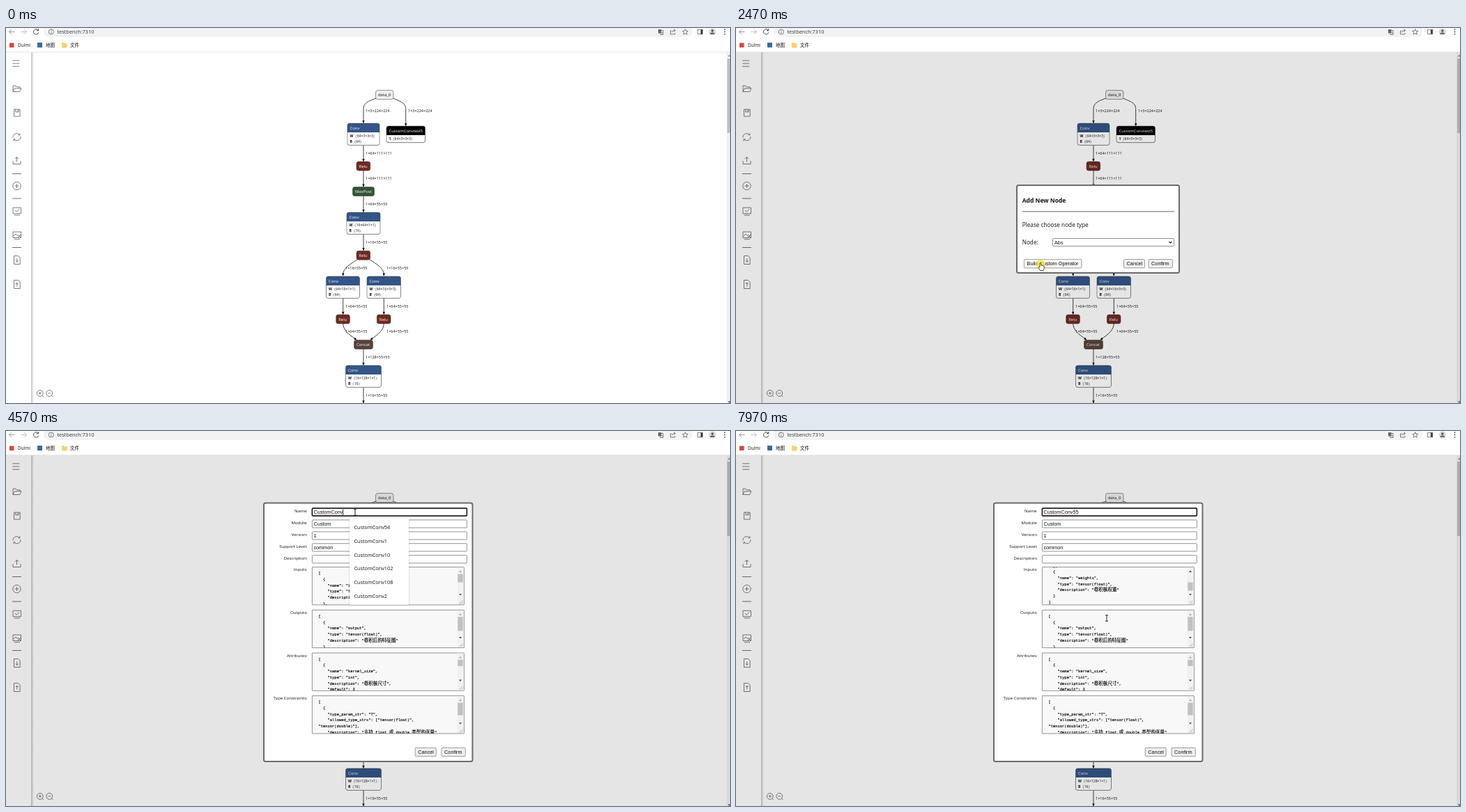
These frames come from a looping animation (1039 by 539 pixels, 8 s). An HTML page:

```html
<!DOCTYPE html>
<html lang="zh-CN">
<head>
<meta charset="utf-8">
<title>Graph editor</title>
<style>
  html, body { margin: 0; height: 100%; overflow: hidden; background: #fff; }
  svg.stage { display: block; width: 100vw; height: 100vh; }
  text { font-family: "Open Sans", "Noto Sans CJK SC", "Noto Sans CJK", sans-serif; fill: #111; }
  .ui { font-family: "Liberation Sans", Arial, sans-serif; font-size: 7.27px; }
  .code { font-family: "Liberation Mono", "Noto Sans CJK SC", "Noto Sans CJK", monospace; font-size: 5.45px; fill: #000; stroke: #000; stroke-width: .14; }
  .end { text-anchor: end; }
  .line { fill: none; stroke: #666; stroke-width: .85; }
  .edge { fill: none; stroke: #111; stroke-width: .8; }
  .field { fill: #fff; stroke: #767676; stroke-width: .8; }
  .focus { fill: none; stroke: #101010; stroke-width: 1.5; }
  .frame { fill: #fff; stroke: #6b6b6b; stroke-width: 2; }
  .wave { stroke: #d33; stroke-width: .7; stroke-dasharray: 1 1; }
  .caretLine { stroke: #000; stroke-width: .8; }
  .glow { fill: #f8ec30; opacity: .75; }
  .move { animation: move 8s ease-in-out infinite; }
  .scroll { animation: scroll 8s infinite; }
  .thumb { animation: thumb 8s infinite; }
  .fade { animation: fade 8s linear infinite; transform-origin: 535.5px 168px; }
  @keyframes scroll {
    0%, 91.75% { transform: none; animation-timing-function: ease-out; }
    96.875%, 100% { transform: translateY(-54.3px); }
  }
  @keyframes thumb {
    0%, 91.75% { transform: none; animation-timing-function: ease-out; }
    96.875%, 100% { transform: translateY(12px); }
  }
  @keyframes fade {
    0%, 65.25% { opacity: 1; transform: none; }
    67.125% { opacity: .1; transform: scale(.955); }
    68.1%, 100% { opacity: 0; transform: scale(.95); }
  }
</style>
</head>
<body>
<script>
const LOOP = 8000;
const pct = ms => ms * 100 / LOOP + '%';

// When each part is visible, in ms.
const visible = {
  tip: [[1180, 1440]],
  dim: [[1440, LOOP]],
  picker: [[1440, 2540]],
  selectFocus: [[1440, 2400]],
  press: [[2400, 2540]],
  form: [[2540, LOOP]],
  nameFocus: [[3030, LOOP]],
  clickAdd: [[1380, 1440]],
  clickBuild: [[2400, 2540]],
  clickName: [[3030, 3100]],
  arrow: [[410, 1180], [1440, 2130], [2540, 2960]],
  hand: [[1180, 1440], [2130, 2540]],
  beam: [[2960, LOOP]],
  listAll: [[3100, 5020]],
  listFive: [[5020, 5580]],
  key1: [[5020, LOOP]],
  key2: [[5220, LOOP]],
  caret0: [[3510, 4040], [4570, 5020]],
  caret1: [[5020, 5220]],
  caret2: [[5220, 5770], [6300, 6830], [7360, 7890]],
  wave0: [[3100, 5020]],
  wave2: [[6520, LOOP]],
  atTop: [[2540, 7340]],
  scrolled: [[7340, LOOP]]
};

// Pointer way points: ms, x, y.
const path = [
  [0, 878, 517], [410, 878, 517], [1180, 17, 231], [1510, 17, 231],
  [2130, 437, 337], [2560, 437, 337], [3030, 500.5, 120], [3170, 500.5, 120],
  [3240, 500.5, 118], [3440, 500.5, 118], [3510, 503, 117], [3580, 501, 117],
  [6170, 501, 117], [6520, 545, 371], [6940, 513, 220], [7020, 513, 220],
  [7160, 513, 219], [7830, 513, 219], [7970, 532, 269], [LOOP, 532, 269]
];

const toggles = Object.entries(visible).map(([name, spans]) =>
  `.${name}{animation:${name} ${LOOP}ms step-end infinite}
   @keyframes ${name}{0%{visibility:hidden}${spans.map(([a, b]) =>
    `${pct(a)}{visibility:visible}${pct(b)}{visibility:hidden}`).join('')}}`).join('');
const moves = `@keyframes move{${path.map(([t, x, y]) =>
  `${pct(t)}{transform:translate(${x}px,${y}px)}`).join('')}}`;
document.head.append(Object.assign(document.createElement('style'), { textContent: toggles + moves }));

const text = (x, y, s, size, extra = '') => `<text x="${x}" y="${y}" font-size="${size}" ${extra}>${s}</text>`;
const ui = (x, y, s) => `<text class="ui" x="${x}" y="${y}">${s}</text>`;
const rect = (x, y, w, h, extra = '') => `<rect x="${x}" y="${y}" width="${w}" height="${h}" ${extra}/>`;
const line = (d, extra = '') => `<path class="line" d="${d}" ${extra}/>`;
const box = (x, y, w, h, cls = 'field') => rect(x, y, w, h, `class="${cls}" rx="1"`);
const circle = (x, y, r, cls) => `<circle cx="${x}" cy="${y}" r="${r}" class="${cls}"/>`;

// Graph
const BLUE = '#335588', RED = '#702921', GREEN = '#335533', BROWN = '#59423b';

function node(x, y, w, name, fill, attrs = []) {
  const h = attrs.length ? 16 + attrs.length * 7.7 : 13;
  const ink = fill === '#eee' ? '#111' : '#fff';
  const body = attrs.length ? `<path fill="#fff" d="M${x} ${y + 13}h${w}v${h - 16}q0 3-3 3h${6 - w}q-3 0-3-3z"/>` : '';
  const rows = attrs.map(([key, dims], i) =>
    text(x + 3.6, y + 20.3 + i * 7.6, `<tspan font-weight="700">${key}</tspan>〈${dims}〉`, 5.1)).join('');
  return rect(x, y, w, h, `rx="3" fill="${fill}"`) + body +
    text(x + 3.5, y + 8.7, name, 5.9, `style="fill:${ink}"`) + rows +
    rect(x, y, w, h, 'rx="3" fill="none" stroke="#333" stroke-width=".5"');
}
const conv = (x, y, w, dims, bias) => node(x, y, w, 'Conv', BLUE, [['W', dims], ['B', bias]]);
const relu = (x, y) => node(x, y, 19.7, 'Relu', RED);
const edge = d => `<path class="edge" d="${d}" marker-end="url(#head)"/>`;
const dims = (x, y, s) => text(x, y + 2, s, 5.5);

const graph = [
  'M531 101C517 106 513 109 513 117V136.5', 'M555.5 101C570 107 573.7 109 573.7 117V140.5',
  'M513 168V191.5', 'M513 205V228', 'M513 241V264.5', 'M513 296V319.5',
  'M504 333C488 343 483.7 347 483.7 356', 'M522 333C538 343 542.3 347 542.3 356',
  'M483.7 388V411.5', 'M542.3 388V411.5',
  'M483.7 424C483.7 434 491 440 503 448', 'M542.3 424C542.3 434 535 440 523 448',
  'M513 461V484.5', 'M513 516V539'
].map(edge).join('') + [
  [516, 119, '1×3×224×224'], [577, 119, '1×3×224×224'],
  [516, 180, '1×64×111×111'], [516, 216, '1×64×111×111'],
  [516, 253, '1×64×55×55'], [516, 308, '1×16×55×55'],
  [487, 345, '1×16×55×55'], [546, 345, '1×16×55×55'],
  [487, 400, '1×64×55×55'], [546, 400, '1×64×55×55'],
  [487, 436, '1×64×55×55'], [546, 436, '1×64×55×55'],
  [516, 473, '1×128×55×55'], [516, 528, '1×16×55×55']
].map(d => dims(...d)).join('') +
  node(530.5, 89.5, 25.5, 'data_0', '#eee') +
  conv(490, 137, 46, '64×3×3×3', '64') +
  node(546, 141, 55.5, 'CustomConvtest5', '#000', [['1', '64×3×3×3']]) +
  relu(503, 192) + node(497.5, 228.5, 31, 'MaxPool', GREEN) +
  conv(489, 265, 48, '16×64×1×1', '16') + relu(503, 320.3) +
  conv(459.5, 357, 48, '64×16×1×1', '64') + conv(518, 357, 48.5, '64×16×3×3', '64') +
  relu(473.7, 412) + relu(532.3, 412) + node(499.5, 448.5, 27, 'Concat', BROWN) +
  conv(487.5, 485, 51, '16×128×1×1', '16');

// Side bar, zoom buttons and page scroll bar
const monitor = y => line(`M10 ${y}h11.5v8.5h-11.5zM11.5 ${y + 10.7}h8.5`);
const sheet = (y, arrow) => line(`M11.5 ${y}h6l2.7 2.7v9.3h-8.7zM15.8 ${y + 3.5}v5.5${arrow}`);
const zoom = (x, sign) => circle(x, 525, 4.4, 'line') + line(`M${x - 2} 525h4${sign}M${x + 3.2} 528.2l2 2`);
const sidebar = rect(36, 35, 4, 504, 'fill="url(#shade)"') + rect(0, 35, 36, 504, 'fill="#fff"') +
  line('M9.3 46.8h10M9.3 51h10M9.3 55.2h10') +
  line('M10 91.5v-8.5h4l1.5 1.7h4.5v2M10 91.5l2.3-4.8h9.7l-2.3 4.8z') +
  line('M11.5 117h8.7v10h-8.7zM13.7 117v3.7h4.4v-3.7M16.6 118v1.5') +
  line('M10 157.5a5.4 5.4 0 0 1 9.5-4M20.9 156a5.4 5.4 0 0 1-9.5 4M17.5 153.8h2.4v-2.5M13.4 159.8h-2.4v2.5') +
  line('M10 191v4.5h11v-4.5M15.5 192.5v-7M12.8 188l2.7-2.7 2.7 2.7') +
  line('M9 209.5h13M9 245h13M9 315.5h13', 'style="stroke:#555"') +
  circle(15.5, 227, 5.7, 'line') + line('M12.5 227h6M15.5 224v6') +
  monitor(258.2) + line('M13 262l2.2 2.2 4-4') +
  monitor(293) + line('M11 299l3-3 3 3M17 297l4 4M21 297l-4 4') +
  sheet(327.5, 'm-2-2l2 2 2-2') + sheet(362.5, 'm-2-3.5l2-2 2 2') +
  zoom(48.8, 'm-2-2v4') + zoom(62.3, '');
const pageScroll = rect(1034, 35, 5, 504, 'fill="#f1f1f1"') + rect(1035, 44, 4, 107, 'fill="#c1c1c1"') +
  '<path fill="#888" d="M1036 41l2-2.5 2 2.5z"/><path fill="#555" d="M1036 536.5h4l-2 2.5z"/>';

// Browser bars
const browser = rect(0, 0, 1039, 34.6, 'fill="#fff"') + rect(0, 34.4, 1039, .7, 'fill="#ddd"') +
  rect(54, -4, 931, 17, 'rx="8" fill="#f1f3f4"') +
  line('M12.5 5.5h-8M8 2l-3.5 3.5 3.5 3.5', 'style="stroke:#8c8c8c"') +
  line('M21.5 5.5h8M26 2l3.5 3.5-3.5 3.5', 'style="stroke:#b5b5b5"') +
  line('M46 3a3.7 3.7 0 1 0 .8 3.5M46.7 1v2.8h-2.8', 'style="stroke:#444;stroke-width:1"') +
  circle(64.8, 5.5, 3.6, 'line') + line('M64.8 5v2.6M64.8 3.2v.9') +
  text(73.5, 8.2, 'testbench:7310', 7.4, 'style="fill:#333"') +
  rect(5, 21.5, 6.5, 6.5, 'fill="#d9463c"') + text(17, 27.3, 'Dulmi', 6.4) +
  rect(45, 21, 7, 7, 'fill="#3f6a9e"') + text(57, 27.3, '地图', 6.6) +
  '<path fill="#f7d36b" d="M80 21h3l1 1h3.5v6.5h-7.5z"/>' + text(92, 27.3, '文件', 6.6) +
  rect(936, 2, 4.5, 5.5, 'fill="#666"') + line('M940.5 3.5h2.5v6h-4v-2M941 6l1.5 2') +
  line('M955.5 4h-2v5h6.5v-2M955.5 6.5q.5-3 4.5-3M958.2 1.5l2.5 2-2.5 2') +
  line('M974.7 1.6l1.2 2.6 2.8.3-2.1 1.9.6 2.8-2.5-1.4-2.5 1.4.6-2.8-2.1-1.9 2.8-.3z') +
  line('M992.7 2.3h7v6.5h-7z') + rect(996.8, 2.3, 3, 6.5, 'fill="#444"') +
  '<circle cx="1013.8" cy="5.5" r="5.2" fill="#d8dbe0"/><circle cx="1013.8" cy="4" r="1.7" fill="#555"/><path fill="#555" d="M1010.5 8.7q0-2.3 3.3-2.3t3.3 2.3z"/>' +
  [2.2, 5.5, 8.8].map(y => `<circle cx="1031.5" cy="${y}" r=".9" fill="#444"/>`).join('');

// Dialogs
const button = (x, y, w, label) =>
  rect(x, y, w, 12.3, 'rx="1.2" fill="#efefef" stroke="#767676" stroke-width=".7"') + ui(x + 4.1, y + 8.9, label);

const picker = rect(403, 226, 233, 126, 'class="frame" rx="2.5"') +
  text(410.7, 251.4, 'Add New Node', 8.5, 'font-weight="700"') +
  rect(411, 263.4, 218, .9, 'fill="#555"') +
  text(410.7, 286.3, 'Please choose node type', 8.23) + text(410.7, 311, 'Node:', 8.23) +
  box(454.5, 302.5, 174, 11) +
  `<g class="selectFocus">${box(454.5, 302.5, 174, 11, 'focus')}</g>` +
  ui(457, 310.8, 'Abs') + line('M621.3 306.8l2.1 2.1 2.1-2.1', 'style="stroke:#111;stroke-width:1.1"') +
  button(413.5, 332.5, 82.3, 'Build Custom Operator') +
  `<g class="press">${rect(413.5, 332.5, 82.3, 12.3, 'rx="1.2" fill="#f7f7f7" stroke="#999" stroke-width=".7"')}${ui(417.6, 341.4, 'Build Custom Operator')}</g>` +
  button(556.5, 332.5, 30, 'Cancel') + button(592, 332.5, 34.4, 'Confirm');

const CELL = 3.27;
function codeLine(s, i) {
  const body = s.trimStart();
  const x = 9.5 + (s.length - body.length) * CELL;
  const mixed = body.replace(/[\u4e00-\u9fff]+/g, m => `<tspan font-size="6.54">${m}</tspan>`);
  return `<text class="code" x="${x}" y="${10.3 + i * 8.72}">${mixed}</text>`;
}
function area(y, lines, thumb, scrolls) {
  const up = (fill, cls = '') => `<path class="${cls}" fill="${fill}" d="M211 7l2-2.4 2 2.4z"/>`;
  return rect(439.4, y, 218, 54.3, 'rx=".5" fill="#f8f8f8" stroke="#767676" stroke-width=".8"') +
    `<svg x="439" y="${y + .4}" width="218" height="53.5">
      <g class="${scrolls ? 'scroll' : ''}">${lines.map(codeLine).join('')}</g>
      ${rect(208.8, 0, 8.7, 53, 'fill="#f1f1f1"')}
      ${rect(209.3, 9.5, 7.5, thumb, `fill="#c1c1c1" class="${scrolls ? 'thumb' : ''}"`)}
      ${scrolls ? up('#a3a3a3', 'atTop') + up('#444', 'scrolled') : up('#a3a3a3')}
      <path fill="#444" d="M211 38.2h4l-2 2.4z"/>
      <path class="line" style="stroke:#888;stroke-width:.6" d="M211.5 52.5l5-5M214.3 52.5l2.2-2.2"/>
    </svg>`;
}
const entry = (name, type, note, tail = '') =>
  ['  {', `    "name": "${name}",`, `    "type": "${type}",`, `    "description": "${note}"${tail}`];
const tensor = 'tensor(float)';

const label = (y, s) => text(432.7, y, s, 6.1, 'class="end"');
const fields = [['Name:', ''], ['Module:', 'Custom'], ['Version:', '1'], ['Support Level:', 'common'], ['Description:', '']];
const caret = (name, x) => `<g class="${name}"><path class="caretLine" d="M${x} 112.4v8.6"/></g>`;
const wave = (name, w) => `<g class="${name}"><path class="wave" d="M441.5 120.6h${w}"/></g>`;
const list = tails => rect(493, 126, 85, tails.length * 19.7 + 5.5, 'fill="#fff" filter="url(#soft)"') +
  tails.map((n, i) => text(499.4, 141.2 + i * 19.7, 'CustomConv' + n, 7.3)).join('');

const FIELD_TOP = 110.9;
const form = rect(370, 103.5, 299.5, 371.4, 'class="frame" rx="2.5"') +
  fields.map(([name, value], i) => {
    const y = FIELD_TOP + i * 16.95;
    return label(y + 6.1, name) + box(439.4, y, 222, 11.2) + ui(441.4, y + 8.2, value);
  }).join('') +
  `<g class="nameFocus">${box(439.4, FIELD_TOP, 222, 11.2, 'focus')}</g>` +
  ui(441.4, FIELD_TOP + 8.2, 'CustomConv<tspan class="key1">5</tspan><tspan class="key2">5</tspan>') +
  wave('wave0', 42) + wave('wave2', 50) +
  caret('caret0', 483.7) + caret('caret1', 487.7) + caret('caret2', 491.7) +
  label(201.3, 'Inputs:') + label(262.8, 'Outputs:') + label(324.6, 'Attributes:') + label(386.3, 'Type Constraints:') +
  area(195.6, ['[', ...entry('input', tensor, '输入特征图'), '  },', ...entry('weights', tensor, '卷积核权重'), '  }', ']'], 12, true) +
  area(257.3, ['[', ...entry('output', tensor, '卷积后的特征图'), '  }'], 20) +
  area(319, ['[', ...entry('kernel_size', 'int', '卷积核尺寸', ','), '    "default": 3'], 9) +
  area(380.6, ['[', '  {', '    "type_param_str": "T",', '    "allowed_type_strs": ["tensor(float)",',
    '"tensor(double)"],', '    "description": "支持 float 或 double 类型的张量"'], 18) +
  button(587.2, 455.3, 30, 'Cancel') + button(625, 455.3, 34.4, 'Confirm') +
  `<g class="listAll">${list([54, 1, 10, 102, 108, 2])}</g>
   <g class="fade"><g class="listFive">${list([54, 5, 51, 53])}</g></g>`;

const pointer = `<g class="move" stroke-linejoin="round">
  <path class="arrow" fill="#fff" stroke="#000" stroke-width=".6" d="M0 0V8.6L2 6.8 3.4 10 4.9 9.4 3.5 6.3H6.2z"/>
  <path class="hand" fill="#fff" stroke="#000" stroke-width=".7" d="M-1 6.5V.9Q0-.5 .9.9V4.2Q2 3.5 2.5 4.5 3.5 4 4 5 5.2 4.7 5.2 6V8.5L4.2 11.5H-.5L-3 7.4Q-2.6 6-1 7z"/>
  <path class="beam" fill="none" stroke="#111" stroke-width=".9" d="M-2-4.2H2M0-4.2V4.2M-2 4.2H2"/>
</g>`;
const click = (name, x, y) => `<g class="${name}">${circle(x, y, 6.5, 'glow')}</g>`;

document.body.innerHTML = `<svg class="stage" viewBox="0 0 1039 539">
  <defs>
    <marker id="head" viewBox="0 0 4 4" refX="3.6" refY="2" markerWidth="4" markerHeight="4" markerUnits="userSpaceOnUse" orient="auto">
      <path d="M0 .3L4 2 0 3.7z"/>
    </marker>
    <linearGradient id="shade"><stop stop-color="#c4c4c4"/><stop offset="1" stop-color="#fff"/></linearGradient>
    <filter id="soft" x="-10%" y="-10%" width="120%" height="120%"><feDropShadow dx="0" dy=".5" stdDeviation="1" flood-opacity=".25"/></filter>
  </defs>
  ${graph}${pageScroll}${sidebar}
  <g class="tip">${rect(35.5, 221, 46, 17.5, 'fill="#fff"')}${text(38, 233, 'Add Node', 8.5)}</g>
  <g class="dim">${rect(0, 35, 1039, 504, 'opacity=".1"')}</g>
  <g class="picker">${picker}</g>
  <g class="form">${form}</g>
  ${browser}
  ${click('clickAdd', 15.5, 227.7)}${click('clickBuild', 437, 339.3)}${click('clickName', 500.5, 120)}
  ${pointer}
</svg>`;
</script>
</body>
</html>
```
